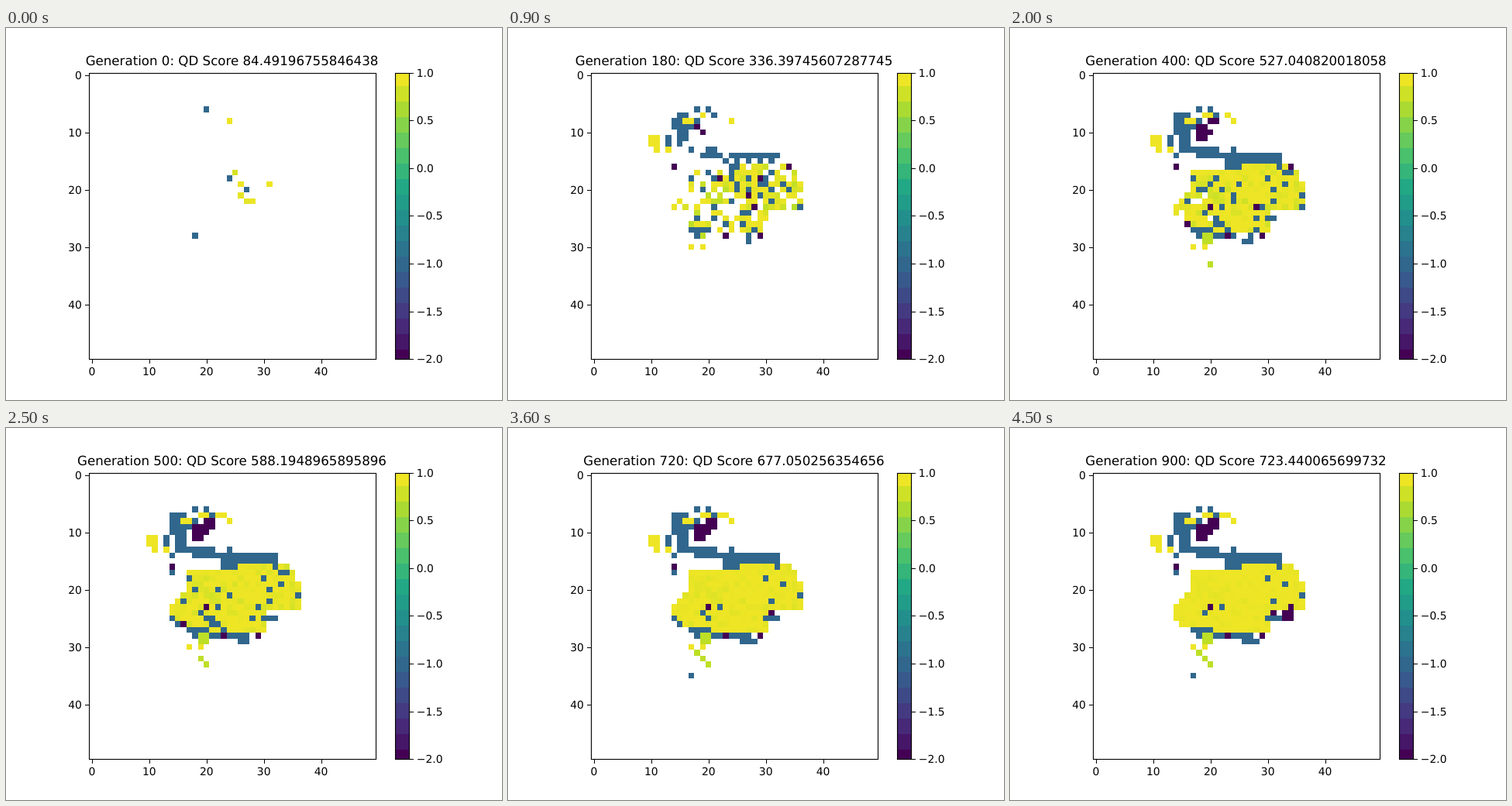
Recreate the animation shown at these times as an HTML page with a canvas. Size 640 px wide and 480 px high, loop 4.6 s.

```html
<!DOCTYPE html>
<html lang="en">
<head>
<meta charset="utf-8">
<title>QD archive heatmap</title>
<style>
  html, body { margin: 0; width: 100%; height: 100%; overflow: hidden; background: #fff; }
  canvas, svg { position: absolute; left: 0; top: 0; width: 640px; height: 480px; }
  text { font: 13.89px "DejaVu Sans", sans-serif; text-rendering: geometricPrecision; }
  #title { font-size: 16.67px; }
</style>
</head>
<body>
<canvas id="plot" width="640" height="480"></canvas>
<svg id="labels" viewBox="0 0 640 480">
  <text id="title" x="291.5" y="48" text-anchor="middle"></text>
</svg>
<script>
const FRAME_MS = 100, FRAMES = 46;
const LEFT = 107.2, TOP = 57.6, SIZE = 369.6, CELL = SIZE / 50;
const ctx = document.getElementById('plot').getContext('2d');
const title = document.getElementById('title');
const labels = document.getElementById('labels');

const VIRIDIS = ['440154', '482475', '414487', '355f8d', '2a788e', '21918c',
  '22a884', '44bf70', '7ad151', 'bddf26', 'fde725'];
const rgb = hex => [0, 2, 4].map(i => parseInt(hex.slice(i, i + 2), 16));
function viridis(v) {
  const i = Math.min(9, Math.floor(v * 10)), k = v * 10 - i;
  const a = rgb(VIRIDIS[i]), b = rgb(VIRIDIS[i + 1]);
  return `rgb(${a.map((c, j) => Math.round(c + (b[j] - c) * k))})`;
}

const GOLD = .977, LIME = .9, BLUE = .333, DARK = 0;

// Regions fill outwards from a core; corners are column, row pairs.
const REGIONS = [
  { tone: GOLD, mixed: true, start: 0, end: 30, core: [28, 21], corners: [17,17, 23,17, 26,16,
    35,16, 36,18, 37,20, 37,24, 31,24, 31,28, 21,28, 20,27, 16,27, 14,26, 14,23, 17,21] },
  { tone: BLUE, start: 1, end: 32, core: [31, 15], corners: [15,13, 22,13, 22,14, 33,14, 33,16,
    26,16, 26,17, 23,17, 23,15, 18,15, 18,14, 15,14] },
  { tone: BLUE, start: 0, end: 18, core: [16, 9], corners: [14,7, 17,7, 17,9, 18,9, 18,10,
    17,11, 17,13, 15,13, 15,11, 14,11] },
  { tone: BLUE, start: 0, end: 30, core: [20, 27], corners: [17,27, 21,27, 21,28, 28,28, 29,29,
    29,30, 26,30, 26,29, 18,29] },
  { tone: BLUE, start: 9, end: 28, core: [30, 25], corners: [30,25, 33,25, 33,26, 30,26] },
  { tone: DARK, start: 8, end: 34, core: [19, 11], corners: [18,9, 20,9, 20,8, 22,8, 22,10,
    21,11, 20,12, 18,12] },
  { tone: DARK, start: 36, end: 45, core: [34, 25], corners: [33,24, 35,23, 35,26, 33,26] },
  { tone: GOLD, start: 0, end: 8, core: [11, 13], corners: [10,12, 11,11, 12,11, 12,14, 11,14,
    11,13, 10,13] },
  { tone: LIME, start: 3, end: 28, core: [20, 28], corners: [19,28, 21,28, 21,30, 19,30] }
];

// Lone cells appear one after the other.
const LONE = [
  { tone: GOLD, start: 0, end: 24, cells: [24,8, 19,7, 16,8, 13,13, 17,30, 19,30, 17,8, 20,7,
    23,7, 22,7] },
  { tone: BLUE, start: 0, end: 30, cells: [20,6, 21,7, 18,8, 20,13, 21,13, 13,11, 13,12, 18,6,
    24,13, 14,14, 14,17, 17,35] },
  { tone: LIME, start: 20, end: 30, cells: [20,33, 19,32, 18,31] },
  { tone: DARK, start: 6, end: 28, cells: [23,28, 29,28, 14,16, 20,23, 31,24] }
];

const SCORES = [[0, 84.49196755846438], [4, 233.09224023529865], [13, 407.1484825301836],
  [20, 527.040820018058], [30, 638.7316059145438], [36, 677.050256354656],
  [45, 723.440065699732]];

function noise(a, b, c) {
  const s = Math.sin(a * 127.1 + b * 311.7 + c * 74.7) * 43758.5453;
  return s - Math.floor(s);
}

const pairs = list => list.flatMap((v, i) => i % 2 ? [] : [[v, list[i + 1]]]);

function inside(corners, x, y) {
  let hit = false;
  corners.forEach(([x0, y0], i) => {
    const [x1, y1] = corners[(i + 1) % corners.length];
    if ((y0 > y) !== (y1 > y) && x < x0 + (x1 - x0) * (y - y0) / (y1 - y0)) hit = !hit;
  });
  return hit;
}

const cells = [];
REGIONS.forEach((region, seed) => {
  const { tone, mixed, start, end, core } = region, corners = pairs(region.corners);
  const reach = Math.max(...corners.map(([x, y]) => Math.hypot(x - core[0], y - core[1])));
  for (let row = 0; row < 50; row++) {
    for (let col = 0; col < 50; col++) {
      const x = col + .5, y = row + .5;
      if (!inside(corners, x, y)) continue;
      const far = Math.hypot(x - core[0], y - core[1]) / reach;
      const order = .4 * far + .6 * noise(row, col, seed);
      const born = start + (end - start) * Math.max(0, (order - .15) / .85) ** 1.5;
      cells.push({ row, col, tone, mixed, born });
    }
  }
});
for (const { tone, start, end, cells: list } of LONE) {
  pairs(list).forEach(([col, row], i, all) => {
    cells.push({ row, col, tone, born: start + (end - start) * (i / (all.length - 1)) ** 3 });
  });
}

// In the mixed body some cells start poor and improve, a few never do.
function toneAt({ row, col, tone, mixed, born }, frame) {
  if (!mixed) return tone;
  const luck = noise(row, col, 21), shade = noise(row, col, 34);
  if (luck < .05) return BLUE;
  if (luck < .32 && frame < born + 4 + 18 * shade) return luck < .07 ? DARK : BLUE;
  return GOLD - .13 * shade ** 3 * Math.exp(-frame / 22);
}

function scoreAt(frame) {
  const exact = SCORES.find(s => s[0] === frame);
  if (exact) return exact[1];
  const i = SCORES.findIndex(s => s[0] > frame) - 1;
  const slope = j => {
    const a = SCORES[Math.max(0, j - 1)], b = SCORES[Math.min(SCORES.length - 1, j + 1)];
    return (b[1] - a[1]) / (b[0] - a[0]);
  };
  const [at, low] = SCORES[i], [next, high] = SCORES[i + 1];
  const span = next - at, t = (frame - at) / span;
  return low + (high - low) * t * t * (3 - 2 * t)
    + span * t * (1 - t) * ((1 - t) * slope(i) - t * slope(i + 1));
}

function fill(color, x, y, w, h) {
  ctx.fillStyle = color;
  ctx.fillRect(x, y, w, h);
}

function box(x0, y0, x1, y1) {
  ctx.strokeStyle = '#000';
  ctx.lineWidth = 1.1;
  ctx.strokeRect(x0 + .5, y0 + .5, x1 - x0, y1 - y0);
}

// The heatmap is sampled on whole pixels, 370 for 50 cells.
const edge = (origin, n) => Math.round(origin + 7.4 * n);

function drawCell({ row, col }, color) {
  const x = edge(107, col), y = edge(57, row);
  fill(color, x, y, edge(107, col + 1) - x, edge(57, row + 1) - y);
}

function drawAxes() {
  box(107, 58, 477, 427);
  for (let n = 0; n < 50; n += 10) {
    fill('#000', Math.round(LEFT + (n + .5) * CELL), 428, 1, 5);
    fill('#000', 102, Math.round(TOP + (n + .5) * CELL), 5, 1);
  }
}

function drawBar() {
  for (let i = 0; i < 19; i++) {
    const y0 = i ? 55 + 20 * i : 58, y1 = Math.min(427, 75 + 20 * i);
    const value = i === 18 ? 0 : 1 - ((y0 + y1) / 2 - TOP) / SIZE;
    fill(viridis(value), 502, y0, 18, y1 - y0);
  }
  box(502, 58, 520, 427);
  for (let i = 0; i < 7; i++) fill('#000', 521, Math.round(TOP + i * SIZE / 6), 5, 1);
}

function label(text, x, y, anchor) {
  const el = document.createElementNS('http://www.w3.org/2000/svg', 'text');
  el.setAttribute('x', x);
  el.setAttribute('y', y);
  el.setAttribute('text-anchor', anchor);
  el.textContent = text;
  labels.append(el);
}

for (let n = 0; n < 50; n += 10) {
  const offset = (n + .5) * CELL;
  label(n, LEFT + offset, 448, 'middle');
  label(n, 97.8, Math.round(TOP + offset) + 5, 'end');
}
for (let i = 0; i < 7; i++) {
  const value = 1 - i / 2;
  label((value < 0 ? '\u2212' : '') + Math.abs(value).toFixed(1),
    529.8, Math.round(TOP + i * SIZE / 6) + 5, 'start');
}

function render(frame) {
  fill('#fff', 0, 0, 640, 480);
  for (const cell of cells) {
    if (cell.born <= frame) drawCell(cell, viridis(toneAt(cell, frame)));
  }
  drawAxes();
  drawBar();
  title.textContent = `Generation ${frame * 20}: QD Score ${scoreAt(frame)}`;
}

let shown = -1;
function tick() {
  const frame = Math.floor(performance.now() / FRAME_MS) % FRAMES;
  if (frame !== shown) render(shown = frame);
  requestAnimationFrame(tick);
}
tick();
</script>
</body>
</html>
```
